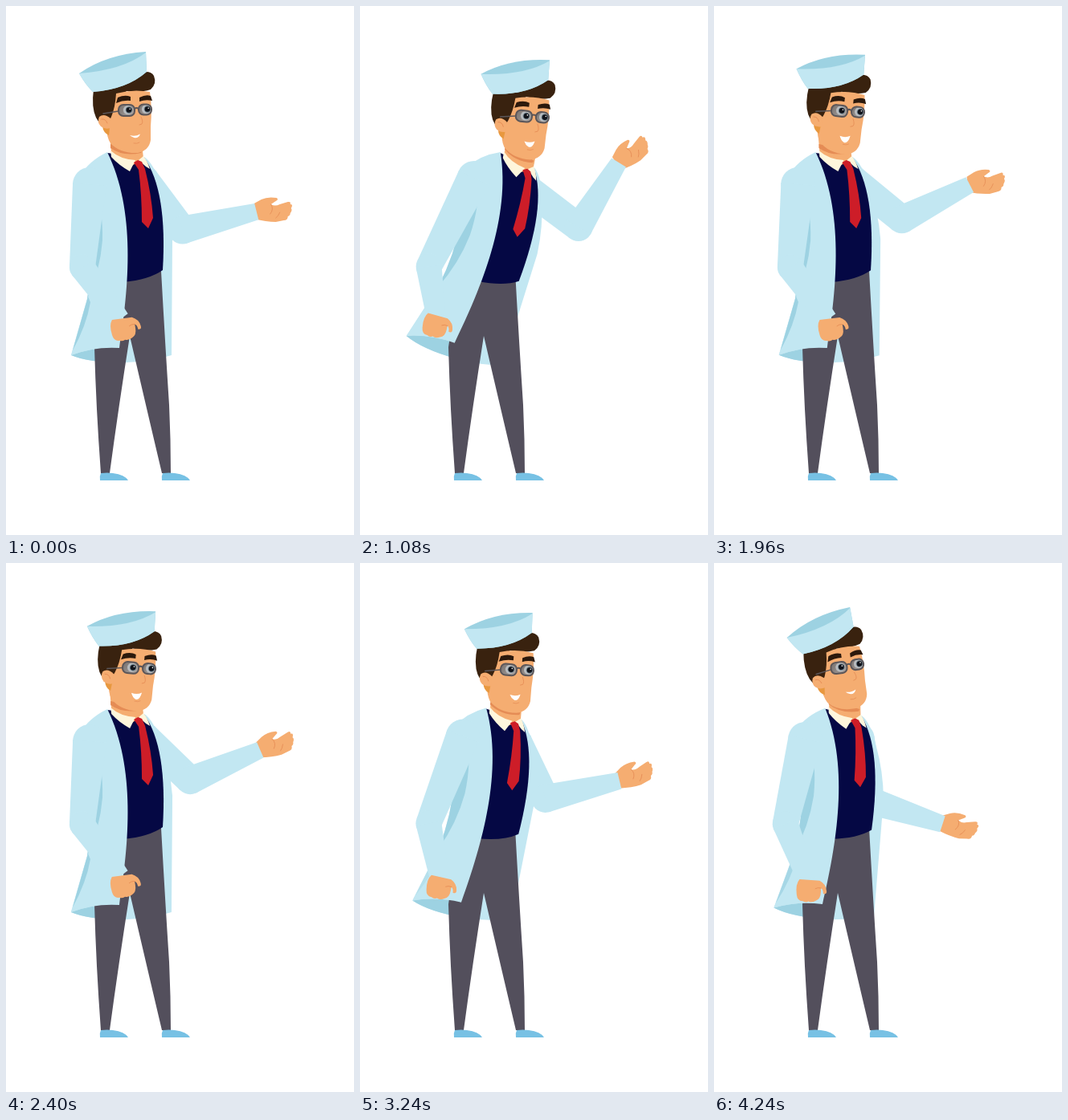
An HTML page with a canvas for the animation above (4280 ms loop, 433x659 px).

```html
<!DOCTYPE html>
<html lang="en">
<head>
<meta charset="utf-8">
<title>Talking doctor</title>
<style>
html, body { margin: 0; width: 100%; height: 100%; overflow: hidden; background: #fff; }
canvas { display: block; width: 433px; height: 659px; }
</style>
</head>
<body>
<canvas id="stage"></canvas>
<script>
const W = 433, H = 659, LOOP = 4280, STEP = 40;
const canvas = document.getElementById('stage');
const ctx = canvas.getContext('2d');
const dpr = window.devicePixelRatio || 1;
canvas.width = W * dpr;
canvas.height = H * dpr;

const COAT = '#c2e7f2', SHADE = '#9dd2e2', SKIN = '#f5ad71', SKIN_DARK = '#e58c55';
const NAVY = '#050844', RED = '#cd1d28', CREAM = '#fef6dc', PANTS = '#534f5c';
const HAIR = '#39220f', BROW = '#2c190c', SHOE = '#77c1e4', FRAME = '#5b5659';

const RAD = Math.PI / 180;
const HIP = [150, 345], NECK = [148, 180];
const FAR_SHOULDER = [172, 216], NEAR_SHOULDER = [104, 222];

// Eases through [time, value] points.
function ease(points, t) {
  const i = Math.max(1, points.findIndex(p => p[0] >= t));
  const [t0, a] = points[i - 1], [t1, b] = points[i];
  const u = (t - t0) / (t1 - t0);
  return a + (b - a) * u * u * (3 - 2 * u);
}

// Half sine wave between two times, zero outside.
function arch(t, from, to) {
  const u = (t - from) / (to - from);
  return u > 0 && u < 1 ? Math.sin(Math.PI * u) : 0;
}

function pose(t) {
  const lean = ease([[0, 0], [1080, 1], [1300, 1], [2000, 0], [2360, 0], [3400, .68], [LOOP, .25]], t);
  const swing = arch(t, 2900, 4600);
  const nearFore = 54 + 28 * lean + 12 * swing;
  return {
    lean,
    body: 17 * lean,
    tilt: ease([[0, 0], [1300, 7], [3400, 4.5], [LOOP, -8]], t),
    smile: 3 + 5 * arch(t, 0, LOOP),
    far: {
      upper: ease([[0, 53], [560, 36], [1900, 39], [LOOP, 81]], t),
      fore: ease([[0, -14], [850, -61], [2200, -24], [2800, -22], [LOOP, 18]], t),
      hand: ease([[0, 0], [850, -38], [1960, -4], [2800, -26], [LOOP, 13]], t),
      lengths: [79, 95], radii: [18, 17.5, 10.5]
    },
    near: {
      upper: 95 + 22 * lean + 4 * swing,
      fore: nearFore,
      hand: .8 * (nearFore - 66),
      lengths: [104 + 20 * lean, 80 - 18 * lean], radii: [21, 16, 12]
    }
  };
}

const paths = {};
const path = d => paths[d] || (paths[d] = new Path2D(d));

function fill(d, color) {
  ctx.fillStyle = color;
  ctx.fill(path(d));
}

function line(d, color, width) {
  ctx.strokeStyle = color;
  ctx.lineWidth = width;
  ctx.lineCap = ctx.lineJoin = 'round';
  ctx.stroke(path(d));
}

function disc(x, y, r, color) {
  ctx.fillStyle = color;
  ctx.beginPath();
  ctx.arc(x, y, r, 0, Math.PI * 2);
  ctx.fill();
}

function at([x, y], angle, draw) {
  ctx.save();
  ctx.translate(x, y);
  ctx.rotate(angle * RAD);
  draw();
  ctx.restore();
}

// Turns a drawing around a pivot, which may have moved.
function turn(pivot, angle, draw, to = pivot) {
  at(to, angle, () => {
    ctx.translate(-pivot[0], -pivot[1]);
    draw();
  });
}

const along = ([x, y], angle, d) => [x + d * Math.cos(angle * RAD), y + d * Math.sin(angle * RAD)];

function onBody([x, y], angle) {
  const p = along(HIP, angle, x - HIP[0]);
  return along(p, angle + 90, y - HIP[1]);
}

function taper(a, ra, b, rb, angle) {
  disc(a[0], a[1], ra, COAT);
  const corners = [along(a, angle + 90, ra), along(b, angle + 90, rb),
    along(b, angle - 90, rb), along(a, angle - 90, ra)];
  ctx.beginPath();
  corners.forEach(c => ctx.lineTo(...c));
  ctx.fill();
}

function arm(shoulder, { upper, fore, hand, lengths, radii }, drawHand, handOnTop) {
  const elbow = along(shoulder, upper, lengths[0]);
  const wrist = along(elbow, fore, lengths[1]);
  if (!handOnTop) at(wrist, hand, drawHand);
  taper(shoulder, radii[0], elbow, radii[1], upper);
  taper(elbow, radii[1], wrist, radii[2], fore);
  if (handOnTop) at(wrist, hand, drawHand);
}

function openHand() {
  fill('M-3 -10L6 -15Q14 -19 25 -17Q28 -15 24 -13L18 -9Q23 -6 29 -9L39 -12' +
    'Q43 -13 42 -9Q46 -9 43 -4Q45 -2 42 2Q42 5 39 6Q39 11 34 11L24 13Q12 13 -3 9Z', SKIN);
  line('M18 -9Q22 -3 17 3M29 1Q27 6 24 8', SKIN_DARK, .8);
}

function fist() {
  fill('M-10 -1Q-15 5 -13 18Q-12 26 -5 26Q-2 28 2 26Q6 28 11 25Q17 23 17 14L17 9' +
    'Q20 11 20 16Q25 17 24 12Q23 4 15 0Z', SKIN);
  line('M10 10Q13 8 17 9', SKIN_DARK, .8);
}

function legs() {
  fill('M122 345L193 330Q198 420 203 497Q205 540 205 582L194 582Q177 510 154 411' +
    'Q140 500 129 582L118 582Q112 500 110 425Z', PANTS);
  for (const x of [117, 194]) {
    at([x, 582], 0, () => fill('M1 0Q9 -1 16 0Q31 2 35 9L0 9Q-1 4 1 0Z', SHOE));
  }
}

function coatBack() {
  fill('M100 210L172 188Q184 196 193 225Q204 255 207 290L206 435Q180 443 150 444' +
    'Q105 445 81 435L101 365L120 300Z', COAT);
  fill('M81 435Q110 424 146 426L146 444Q105 445 81 435Z', SHADE);
}

function sweater() {
  fill('M126 183L172 189Q201 230 195 329Q178 341 146 344L120 344Z', NAVY);
  fill('M129 160L131 182L155 200L171 190L168 160Z', SKIN);
  fill('M130 177Q146 188 168 183L169 180L130 172Z', SKIN_DARK);
  fill('M130 180Q142 191 161 192L154 206Q140 198 131 188Z', CREAM);
  fill('M165 192L171 187Q176 193 179 203L174 200Z', CREAM);
  fill('M159 195L164 192L169 194L173 203Q181 235 183 264L177 277L169 269Q169 235 165 204Z', RED);
}

function coatFront(lean) {
  fill('M126 182C162 255 153 350 141 426Q110 424 81 435L101 365Q109 320 104 278' +
    'L92 212Q103 193 126 182Z', COAT);
  fill('M109 222Q121 252 120 292Q117 330 101 365Q109 320 104 278Z', SHADE);
  ctx.globalAlpha = 1 - lean;
  fill('M102 362L105 369Q100 398 83 429Z', SHADE);
  ctx.globalAlpha = 1;
}

function lens(x, y, w, h) {
  const g = ctx.createLinearGradient(x - w / 2, y - h / 2, x + w / 2, y + h / 2);
  g.addColorStop(0, '#77716f');
  g.addColorStop(1, '#aea7a3');
  const rim = new Path2D();
  rim.roundRect(x - w / 2, y - h / 2, w, h, 6);
  ctx.fillStyle = g;
  ctx.fill(rim);
  disc(x + 1.5, y - .5, 5.6, '#b9bcbf');
  disc(x + 3, y - .5, 4.2, '#667a86');
  disc(x + 3, y - .5, 3.3, '#11131a');
  disc(x + 4.2, y - 1.8, .8, '#fff');
  ctx.strokeStyle = FRAME;
  ctx.lineWidth = 2;
  ctx.stroke(rim);
}

function mouth(open) {
  ctx.fillStyle = '#fff';
  ctx.beginPath();
  ctx.moveTo(154, 161);
  ctx.quadraticCurveTo(161, 163, 167, 159.5);
  ctx.quadraticCurveTo(165, 162 + open, 160, 161.5 + open * .9);
  ctx.quadraticCurveTo(156, 161 + open * .7, 154, 161);
  ctx.fill();
}

function head(open) {
  fill('M109 104Q106 126 112 139Q117 149 127 151L140 118L150 106Q168 108 180 104' +
    'Q188 97 184 87Q180 80 168 83L120 92Z', HAIR);
  fill('M137 109Q158 103 179 107Q182 128 180 150L180 167Q178 180 164 183' +
    'Q142 184 130 171Q125 163 125 150L131 138Q136 126 137 109Z', SKIN);
  fill('M120 150Q125 152 129 151L128 161Q121 158 120 150Z', '#e8983f');
  fill('M130 140Q122 133 116 138Q113 145 118 150Q123 154 130 152Z', SKIN);
  line('M119 141Q124 140 126 146', SKIN_DARK, .9);
  fill('M137 121L139 114Q148 110 155 113L155 118Q146 117 137 121Z', BROW);
  fill('M166 114Q174 110 180 112L182 118Q174 116 166 119Z', BROW);
  line('M168 138Q171 144 169 147L166 148', SKIN_DARK, .8);
  line('M121 134L140 131', FRAME, 1.5);
  line('M160 128Q162 126 165 128', FRAME, 2);
  lens(150, 130, 20, 14);
  lens(173, 129, 16, 13);
  mouth(open);
  line('M159 171Q163 172 166 170', SKIN_DARK, .7);
  fill('M91 84Q125 60 174 57L175 82Q150 104 108 107Q99 98 91 84Z', SHADE);
  fill('M91 84Q145 80 174 58L175 82Q150 104 108 107Q99 98 91 84Z', COAT);
}

function draw(t) {
  const p = pose(t);
  ctx.setTransform(dpr, 0, 0, dpr, 0, 0);
  ctx.fillStyle = '#fff';
  ctx.fillRect(0, 0, W, H);

  turn(HIP, p.body, coatBack);
  arm(onBody(FAR_SHOULDER, p.body), p.far, openHand, false);
  legs();
  turn(HIP, p.body, () => {
    sweater();
    coatFront(p.lean);
  });
  arm(onBody(NEAR_SHOULDER, p.body), p.near, fist, true);
  turn(NECK, p.tilt, () => head(p.smile), onBody(NECK, p.body));
}

const start = performance.now();
function tick() {
  const t = (performance.now() - start) % LOOP;
  draw(Math.floor(t / STEP) * STEP);
  requestAnimationFrame(tick);
}
tick();
</script>
</body>
</html>
```
